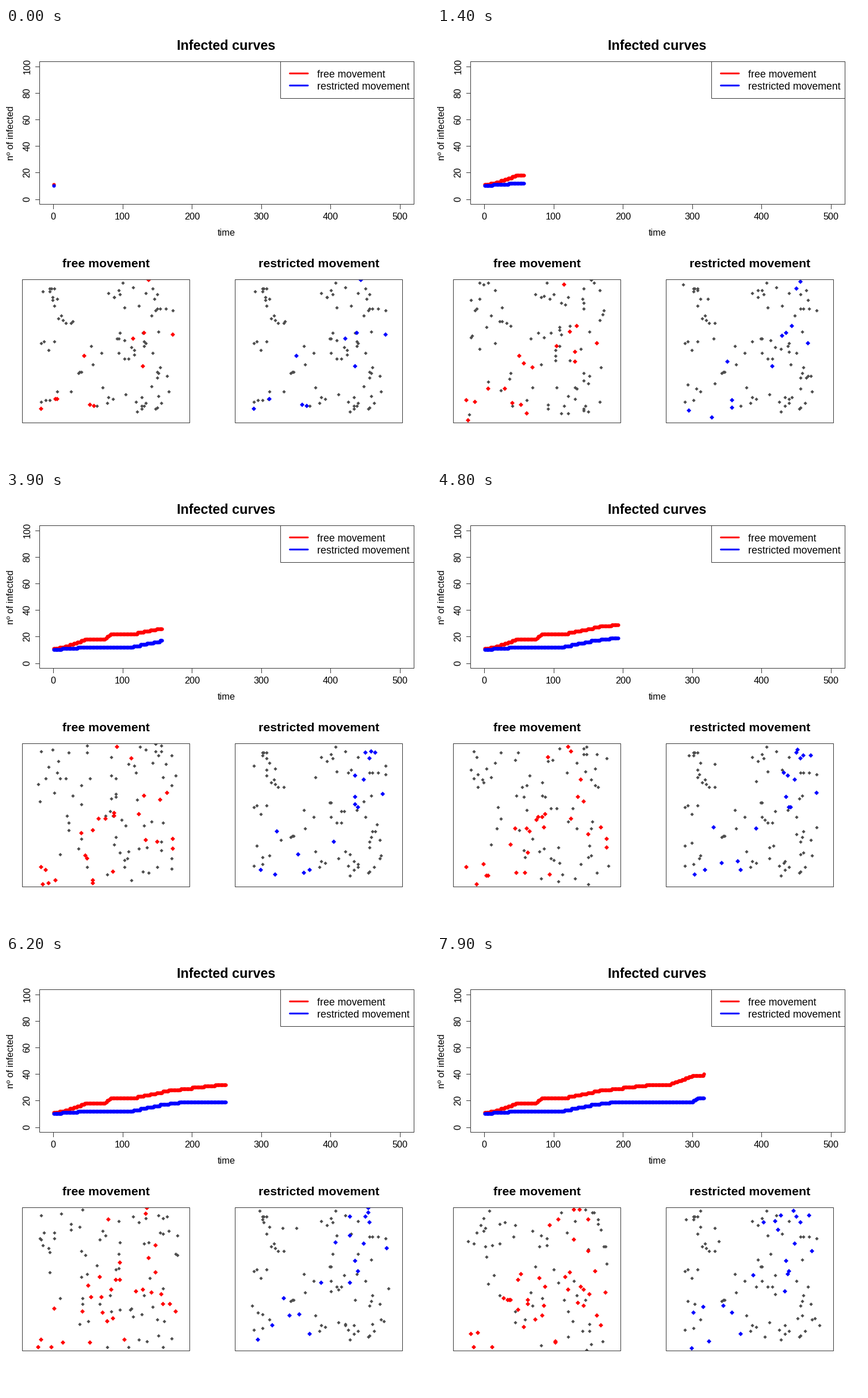
Animation of 739 by 758 pixels, one loop 8 s. Source, as a matplotlib script:

```python
import numpy as np
import matplotlib.pyplot as plt
from matplotlib.animation import FuncAnimation
from matplotlib.patches import Rectangle

W, H, DPI = 739, 758, 64
PX = 72 / DPI                       # one pixel in points
FRAMES, STEP = 80, 4                # simulation steps per frame
T_END = 1 + STEP * (FRAMES - 1)
CELL, LEFT, BOTTOM = 2.49, 50, 686  # 100 x 100 grid inside a panel
SHIFT = 369.5                       # from the left panel to the right one
WALKERS = 30                        # people who walk in the restricted world
RED, BLUE, GREY, INK = "#ff0000", "#0000ff", "#4d4d4d", "#383838"

# First cases; the last one is ill only in the free world
CASES = [(61, 662), (88, 645), (146, 655), (153, 657), (136, 570), (220, 540),
         (240, 530), (238, 587), (290, 533), (248, 438), (86, 645)]
# Where the healthy live: x, y, spread, people
GROUPS = [(82, 465, 13, 9), (114, 511, 9, 6), (74, 552, 9, 4), (74, 648, 10, 4),
          (130, 582, 25, 7), (195, 470, 13, 7), (200, 545, 14, 6),
          (262, 475, 24, 13), (240, 562, 16, 9), (265, 612, 15, 7),
          (245, 662, 15, 11), (187, 645, 16, 6)]
# Key points (time, infected) of the curves
FREE_CURVE = [(1, 11), (24, 14), (46, 18), (73, 18), (83, 22), (113, 22),
              (167, 28), (234, 32), (265, 32), (300, 39), (316, 39), (317, 40)]
TIED_CURVE = [(1, 10), (13, 11), (36, 12), (106, 12), (154, 17), (182, 19),
              (299, 19), (308, 22)]

plt.rcParams["font.family"] = "Liberation Sans"


def fold(cells):
    """Reflect positions at the walls of the grid."""
    return 100 - np.abs(99 - np.mod(cells - 1, 198))


def to_cells(points):
    p = np.asarray(points, float)
    ij = np.stack([p[:, 0] - LEFT, BOTTOM - p[:, 1]], -1) / CELL + 0.5
    return fold(np.rint(ij))


def to_pixels(cells, shift):
    x = LEFT + shift + CELL * (cells[:, 0] - 0.5)
    return x, BOTTOM - CELL * (cells[:, 1] - 0.5)


def make_homes(rng):
    healthy = np.vstack([rng.normal((x, y), s, (n, 2)) for x, y, s, n in GROUPS])
    return to_cells(np.vstack([CASES, rng.permutation(healthy)]))


def walk(rng, homes, walkers):
    """Paths over time; only the first walkers leave home."""
    steps = rng.integers(-1, 2, (T_END + 1,) + homes.shape)
    steps[:2] = 0
    steps[:, walkers:] = 0
    return fold(homes + np.cumsum(steps, axis=0))


def infected_counts(curve):
    t, n = np.transpose(curve)
    return np.floor(np.interp(np.arange(T_END + 1), t, n) + 1e-9).astype(int)


def spread(path, counts):
    """Time of infection: the healthy person closest to a case is next."""
    caught = np.full(path.shape[1], np.inf)
    caught[:counts[1]] = 1
    for t in range(2, T_END + 1):
        for _ in range(counts[t] - counts[t - 1]):
            ill = np.isfinite(caught)
            gap = path[t][:, None] - path[t][ill]
            dist = np.linalg.norm(gap, axis=-1).min(axis=1)
            dist[ill] = np.inf
            caught[dist.argmin()] = t
    return caught


fig = plt.figure(figsize=(W / DPI, H / DPI), dpi=DPI, facecolor="white")
ax = fig.add_axes([0, 0, 1, 1])
ax.set_xlim(0, W)
ax.set_ylim(H, 0)
ax.axis("off")


def text(x, y, s, size=16.2, ha="center", **kw):
    ax.text(x, y, s, fontsize=size * PX, ha=ha, va="baseline",
            rotation_mode="anchor", **kw)


def line(x, y, color=INK, width=1, **kw):
    ax.plot(x, y, color=color, lw=width * PX, **kw)


def box(x0, y0, x1, y1, fc="none"):
    return ax.add_patch(Rectangle((x0, y0), x1 - x0, y1 - y0, ec=INK, fc=fc,
                                  lw=PX, zorder=5))


def dots(marker, size, color, zorder=3):
    return ax.plot([], [], marker, ms=size * PX, color=color, mew=0,
                   zorder=zorder)[0]


def chart_x(t):
    return 82 + 1.206 * t


def chart_y(n):
    return 297.5 - 2.305 * n


def draw_chart():
    text(383, 38.3, "Infected curves", 23.4, weight="bold")
    text(383, 361, "time")
    text(12.6, 183, "nº of infected", rotation=90)
    box(58, 58, 709, 306)
    for v in range(0, 501, 100):
        line([chart_x(v)] * 2, [306, 314])
        text(chart_x(v), 333, str(v))
    for v in range(0, 101, 20):
        line([51, 58], [chart_y(v)] * 2)
        text(41.3, chart_y(v), str(v), rotation=90)
    box(477, 58, 709, 122, fc="white")
    for y, color, label in ((79, RED, "free movement"),
                            (100, BLUE, "restricted movement")):
        line([493.5, 525], [y, y], color, 3, solid_capstyle="round",
             snap=False, zorder=6)
        text(541, y + 7, label, 17.8, ha="left", zorder=6)


class World:
    def __init__(self, title, path, curve, color, shift):
        self.path, self.shift = path, shift
        self.counts = infected_counts(curve)
        self.caught = spread(path, self.counts)
        text(174.5 + shift, 416.3, title, 21.3, weight="bold")
        frame = box(28.4 + shift, 437, 319.4 + shift, 686)
        self.curve = dots("o", 6.2, color)
        self.well = dots("D", 4.4, GREY)
        self.ill = dots("D", 5.2, color, zorder=4)
        for d in (self.well, self.ill):
            d.set_clip_path(frame)

    def show(self, t):
        past = np.arange(1, t + 1)
        self.curve.set_data(chart_x(past), chart_y(self.counts[1:t + 1]))
        ill = self.caught <= t
        self.well.set_data(*to_pixels(self.path[t][~ill], self.shift))
        self.ill.set_data(*to_pixels(self.path[t][ill], self.shift))
        return [self.curve, self.well, self.ill]


rng = np.random.default_rng(7)
homes = make_homes(rng)
draw_chart()
worlds = [
    World("free movement", walk(rng, homes, len(homes)), FREE_CURVE, RED, 0),
    World("restricted movement", walk(rng, homes, WALKERS), TIED_CURVE, BLUE,
          SHIFT),
]


def draw(k):
    return [a for w in worlds for a in w.show(1 + STEP * k)]


anim = FuncAnimation(fig, draw, frames=FRAMES, interval=100,
                     init_func=lambda: draw(0), repeat=True, repeat_delay=0)
plt.show()
```
